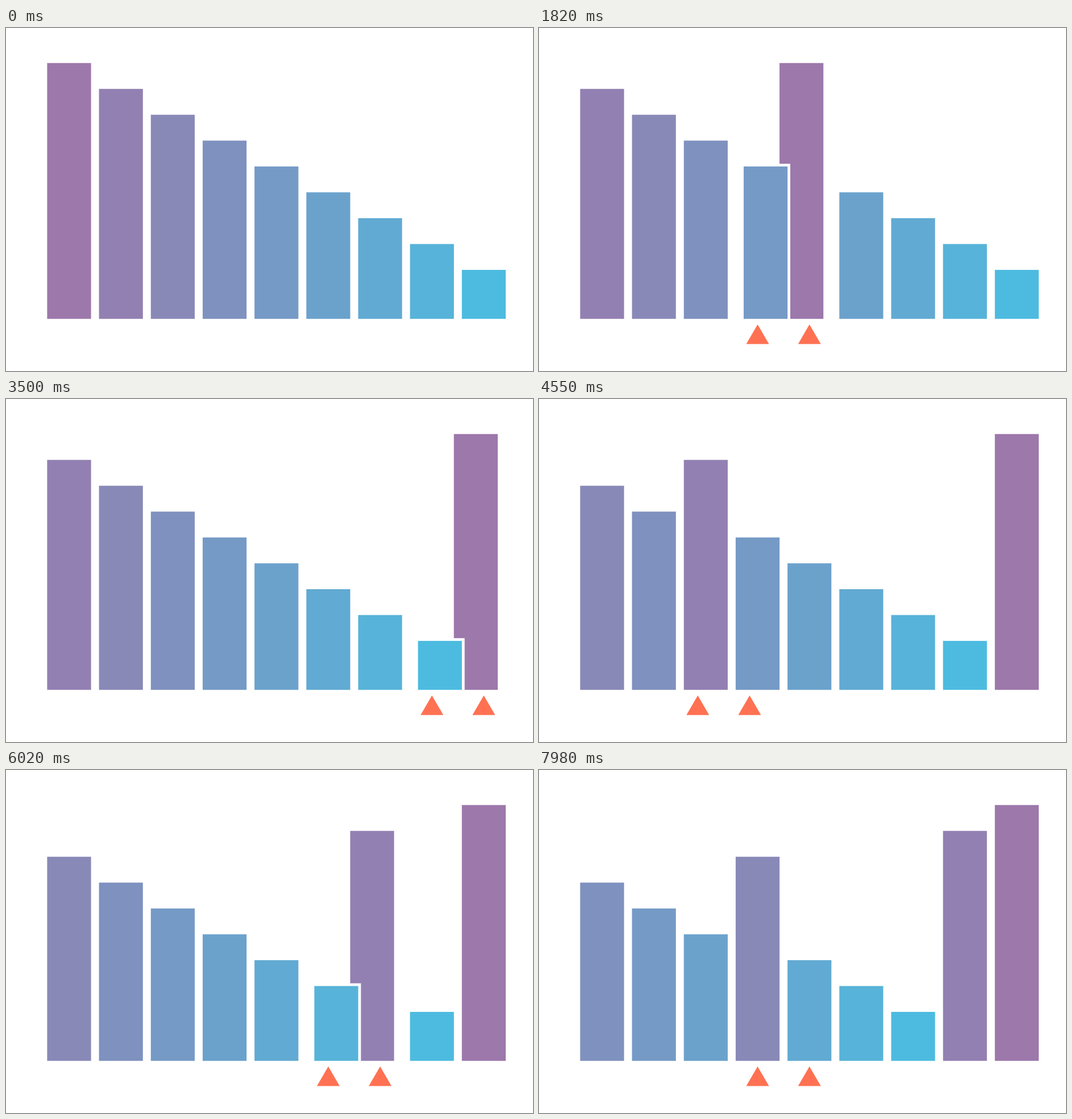
An HTML page with a canvas that plays this animation: 927x604 px, repeating every 8000 ms.

```html
<!DOCTYPE html>
<html lang="en">
<head>
<meta charset="utf-8">
<title>Bubble sort</title>
<style>
  html, body { margin: 0; width: 100%; height: 100%; overflow: hidden; background: #fff; }
  canvas { display: block; }
</style>
</head>
<body>
<canvas id="stage" width="927" height="604"></canvas>
<script>
const ctx = document.getElementById('stage').getContext('2d');
const LOOP = 8000, TICK = 70;
const COUNT = 9, LEFT = 72.4, PITCH = 91.18, BAR_W = 77.2;
const TOP = 61.7, RISE = 45.53, BASE = 512.2, OUTLINE = 4.8;
const START = 3, PHASE = 3;   // ticks before the sort, ticks per move
const MARK = '#ff7152';

const lerp = (a, b, t) => a + (b - a) * t;
const sigmoid = x => 1 / (1 + Math.exp(-x));

function smooth(t) {
  const edge = sigmoid(-5);
  return (sigmoid(10 * (t - 0.5)) - edge) / (1 - 2 * edge);
}

// Left slot of each compared pair, pass after pass
const pairs = [];
for (let end = COUNT - 1; end > 0; end--) {
  for (let j = 0; j < end; j++) pairs.push(j);
}

const barColor = i => {
  const t = i / (COUNT - 1);
  const mix = (a, b) => Math.round(lerp(a, b, t));
  return `rgb(${mix(157, 77)},${mix(120, 187)},${mix(171, 224)})`;
};

function drawBar(i, slot) {
  const x = LEFT + slot * PITCH, y = TOP + i * RISE, h = BASE - y;
  ctx.fillStyle = '#fff';
  ctx.fillRect(x - OUTLINE, y - OUTLINE, BAR_W + 2 * OUTLINE, h + 2 * OUTLINE);
  ctx.fillStyle = barColor(i);
  ctx.fillRect(x, y, BAR_W, h);
}

function drawMark(slot) {
  const x = LEFT + BAR_W / 2 + slot * PITCH;
  ctx.fillStyle = MARK;
  ctx.beginPath();
  ctx.moveTo(x, 522);
  ctx.lineTo(x + 20, 556.6);
  ctx.lineTo(x - 20, 556.6);
  ctx.fill();
}

function draw(time) {
  const tick = Math.floor((time % LOOP) / TICK) - START;
  const step = Math.floor(tick / (2 * PHASE));
  const phase = tick - step * 2 * PHASE;
  const ease = smooth((phase % PHASE) / PHASE);
  const swapping = phase >= PHASE;

  const order = [...Array(COUNT).keys()];
  for (let k = 0; k < step; k++) {
    const j = pairs[k];
    [order[j], order[j + 1]] = [order[j + 1], order[j]];
  }
  const slots = [];
  order.forEach((bar, slot) => { slots[bar] = slot; });

  const pair = pairs[step];
  if (step >= 0 && swapping) {
    slots[order[pair]] += ease;
    slots[order[pair + 1]] -= ease;
  }

  ctx.fillStyle = '#fff';
  ctx.fillRect(0, 0, 927, 604);
  slots.forEach((slot, bar) => drawBar(bar, slot));

  if (step < 0) return;
  const from = step ? pairs[step - 1] : pair;
  const mark = swapping ? pair : lerp(from, pair, ease);
  ctx.globalAlpha = step || swapping ? 1 : ease;
  drawMark(mark);
  drawMark(mark + 1);
  ctx.globalAlpha = 1;
}

const begin = performance.now();
function loop() {
  draw(performance.now() - begin);
  requestAnimationFrame(loop);
}
loop();
</script>
</body>
</html>
```
